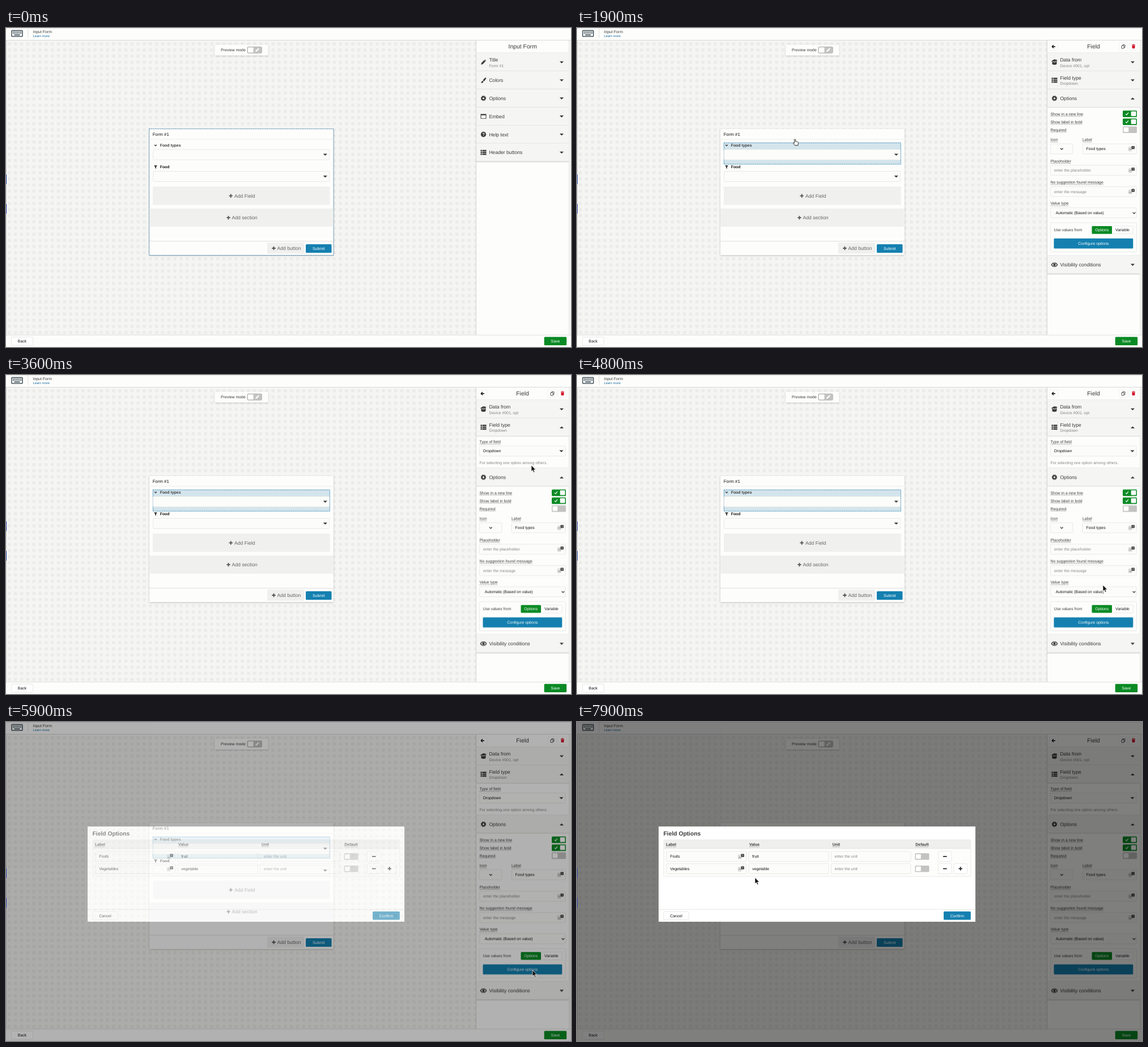
An HTML page for the animation above (8000 ms loop, 997x562 px).

```html
<!DOCTYPE html>
<html lang="en">
<head>
<meta charset="utf-8">
<title>Form editor</title>
<style>
  html, body { margin: 0; width: 100%; height: 100%; overflow: hidden; background: #fdfdfc; }
  svg { display: block; width: 100vw; height: 100vh; }
  text { font-family: "Liberation Sans", Arial, sans-serif; fill: #3a3a3a; text-rendering: geometricPrecision; white-space: pre; }
  .bold { font-weight: 700; }
  .mid { text-anchor: middle; }
  .white { fill: #fff; }
  .black { fill: #111; }
  .soft { fill: #858585; }
  .grey { fill: #666; }
  .link { fill: #1a6f9f; }
  .icon { fill: #3a3a3a; }
  .line { fill: none; stroke: #3a3a3a; }
</style>
</head>
<body>
<svg id="stage" viewBox="0 0 997 562" xmlns="http://www.w3.org/2000/svg"></svg>
<script>
const BLUE = '#1580b0', GREEN = '#0a8a24', EDGE = '#e4e4e2', PALE = '#f5f5f3', PAPER = '#fdfdfc';
const S = 6.92, M = 8.65, L = 10.38;

// Text is placed by the middle of its capitals
const text = (x, y, s, cls = '', size = S) =>
  `<text x="${x}" y="${y + size * .36}" font-size="${size}" class="${cls}">${s}</text>`;
const label = (x, y, s, cls = '') => text(x, y, s, 'label ' + cls);
const box = (x, y, w, h, fill, stroke = 'none', r = 0, extra = '') =>
  `<rect x="${x}" y="${y}" width="${w}" height="${h}" rx="${r}" fill="${fill}" stroke="${stroke}" stroke-width=".8" ${extra}/>`;
const rule = (x1, y1, x2, y2, color = '#dcdcda') =>
  `<path d="M${x1} ${y1}L${x2} ${y2}" stroke="${color}" stroke-width=".9"/>`;
const group = (cls, ...parts) => `<g class="${cls}">${parts.join('')}</g>`;
const at = (x, y, ...parts) => `<g transform="translate(${x} ${y})">${parts.join('')}</g>`;
const caret = (x, y, up) => at(x, y, `<path d="${up ? 'M-3.6 1.8h7.2L0-1.8z' : 'M-3.6-1.8h7.2L0 1.8z'}" class="icon"/>`);
const chevron = (x, y, k = 1) => at(x, y, `<path d="M${-2.4 * k} ${-1.2 * k}L0 ${1.2 * k}L${2.4 * k} ${-1.2 * k}" class="line" stroke-width="1.3"/>`);
const plus = (x, y, color = '#555', r = 3.2) =>
  `<path d="M${x - r} ${y}h${2 * r}M${x} ${y - r}v${2 * r}" stroke="${color}" stroke-width="1.8"/>`;
const button = (x, y, w, h, s, fill, cls = 'white', stroke = 'none') =>
  box(x, y, w, h, fill, stroke, 1.5) + text(x + w / 2, y + h / 2, s, 'mid ' + cls);
const toggle = (x, y, on) => box(x, y, 25, 11.4, on ? GREEN : '#c3c3c1', 'none', 1.5)
  + box(x + (on ? 14.7 : 1.5), y + 1.6, 8.8, 8.2, '#fff', 'none', 1)
  + (on ? `<path d="M${x + 5} ${y + 5.8}l1.8 1.8 3.2-4" fill="none" stroke="#fff" stroke-width="1.2"/>` : '');
const translate = (x, y) => at(x, y,
  box(-4.8, -2.4, 5, 6.2, '#fff', '#aaa', .5), text(-2.3, .8, 'A', 'mid', 5.2),
  box(0, -4.4, 5.4, 5.2, '#3a3a3a', 'none', .6), box(1.7, -2.9, 2.2, .7, '#ddd'), box(2.4, -2.2, .8, 1.6, '#ddd'));
const input = (x, y, w, s = '', cls = 'black', h = 17.8) =>
  box(x, y, w, h, '#fcfcfa', EDGE, 1.5) + text(x + 6.2, y + h / 2, s, cls);

const icons = {
  pencil: '<path d="M-4.2 4.2l.7-2.9L1.4-3.6l2.2 2.2-4.9 4.9zM2-4.2l.8-.6 2 2-.7.8z"/>',
  brush: '<path d="M4.6-4.6c-1-.5-4.6 3-5.6 4.8l1.6 1.6c1.8-1 5-5.2 4-6.4zM-1.5.9l1.5 1.5c0 2-2.5 2.6-4.6 2.2 1.4-.9 1-3.2 3.1-3.7z"/>',
  gear: '<circle r="2.7" fill="none" stroke="#3a3a3a" stroke-width="2.2"/><circle r="4" fill="none" stroke="#3a3a3a" stroke-width="1.5" stroke-dasharray="1.57"/>',
  frame: '<path d="M-5-4.2H5V4.2H-5zM-4-1.8V3.3H4V-1.8z" fill-rule="evenodd"/>',
  help: '<circle r="4.6"/>' + text(0, 0, '?', 'mid bold white', 7.5),
  list: [-3.2, 0, 3.2].map(y => box(-5, y - 1.2, 2.4, 2.4, '#3a3a3a') + box(-1.9, y - 1.2, 7, 2.4, '#3a3a3a')).join(''),
  data: '<path d="M-4-2.5C-3-4 3-4 4-2.5V3.2C3 5-3 5-4 3.2z"/><path d="M-5-1.5L0-4.5 4.8-3.3" fill="none" stroke="#3a3a3a" stroke-width="1.2"/><path d="M-3-1.2C-1 0 1 0 3-1.2" fill="none" stroke="#fff"/>',
  eye: '<path d="M-5.2 0C-3-4.2 3-4.2 5.2 0 3 4.2-3 4.2-5.2 0z" fill="none" stroke="#3a3a3a" stroke-width="1.2"/><circle r="2.2"/>',
  funnel: '<path d="M-2.9-2.9H2.9L.9 0V3L-.9 1.8V0z"/>'
};
const icon = (name, x, y) => at(x, y, `<g class="icon">${icons[name]}</g>`);

// Panel accordion header
const row = (y, name, title, sub, open) =>
  box(830, y, 163.5, 31.7, PALE) + rule(830, y + 31.7, 993.5, y + 31.7, '#d3d3d1')
  + icon(name, 842.5, y + 15.9) + text(852.4, y + (sub ? 11.5 : 15.9), title, '', M)
  + (sub ? text(852.4, y + 21.9, sub, 'soft') : '')
  + (open === null ? '' : caret(980.5, y + 16.2, open));

const topBar = group('', box(0, 0, 997, 21.5, PAPER), rule(0, .4, 997, .4, EDGE), rule(0, 21.5, 997, 21.5, '#d6d6d4'),
  box(10, 4.3, 19, 10.6, '#fff', '#24363f', 1, 'style="stroke-width:1.3"'),
  [6.7, 9.2].map(y => `<path d="M12 ${y}h15.5" stroke="#24363f" stroke-width="1.5" stroke-dasharray="1.5 .9"/>`).join(''),
  box(14.5, 11.5, 10, 1.5, '#24363f'), rule(39, 1, 39, 17.5),
  text(47.5, 7, 'Input Form'), text(47.5, 13.8, 'Learn more', 'link', 5.77));

const preview = group('',
  `<g filter="url(#shade)">${box(368.5, 29.5, 94, 18.7, PAPER)}</g>`,
  text(379, 38.8, 'Preview mode'), box(426, 33.2, 25.3, 11, '#c3c3c1', '#aaa', 1.5), box(427, 34.2, 9.5, 9, '#fff', 'none', 1),
  at(443.5, 38.7, `<g fill="#fff" transform="scale(.8)">${icons.pencil}</g>`));

const form = group('',
  `<g filter="url(#shade)">${box(253, 178, 324.8, 222, PAPER)}</g>`,
  group('formEdge', box(252.7, 177.7, 325.3, 222.8, 'none', '#2b74a0', 0, 'stroke-dasharray="2.2 1"')),
  text(258.8, 186.8, 'Form #1', 'black', 7.79), rule(253, 196, 577.5, 196, '#ebebe9'),
  group('tint', box(259, 202, 312.5, 38, '#d3e4ec')),
  group('press', box(259, 202, 312.5, 38, '#a9cbdc')),
  group('picked', box(259.3, 202.3, 312, 37.7, 'none', '#1f7cab', 0, 'stroke-dasharray="2.2 1"')),
  chevron(264, 206.7, .8), text(271.7, 206.5, 'Food types', 'bold'),
  input(259.6, 214, 311, '', '', 18.3), caret(563.3, 223.2),
  icon('funnel', 264, 245), text(271.7, 245, 'Food', 'bold black'),
  input(259.6, 252.5, 311, '', '', 18), caret(563.3, 261.7),
  box(259, 279.3, 312.5, 32.3, '#f0f0ef'), plus(396.7, 295.7), text(403, 295.7, 'Add Field', 'grey', M),
  box(253.2, 318, 324.3, 32, '#f0f0ef'), plus(392.5, 334.2), text(398.5, 334.2, 'Add section', 'grey', M),
  rule(253, 375.6, 577.5, 375.6),
  box(461, 378, 65, 19.5, '#f0f0ef'), plus(472.5, 388), text(478.5, 388, 'Add button', 'grey', M),
  button(529, 381, 45.5, 15, 'Submit', BLUE));

const formPanel = group('formPanel',
  text(911.7, 32.7, 'Input Form', 'mid', L), rule(830, 44, 993.5, 44),
  [['pencil', 'Title', 'Form #1'], ['brush', 'Colors'], ['gear', 'Options'], ['frame', 'Embed'], ['help', 'Help text'], ['list', 'Header buttons']]
    .map(([name, title, sub], i) => row(44.3 + i * 31.8, name, title, sub)).join(''),
  box(830, 235, 163.5, 2, '#00000010'));

const options = group('options',
  row(108, 'gear', 'Options', '', true),
  ['Show in a new line', 'Show label in bold', 'Required'].map((s, i) =>
    label(835.5, 151.2 + i * 14, s) + toggle(963, 145.5 + i * 14, i < 2)).join(''),
  label(835.5, 196.7, 'Icon'), input(835.7, 204, 39.3), chevron(855.3, 213),
  label(892, 196.7, 'Label'), input(892.3, 204, 95, 'Food types'), translate(978.5, 212.5),
  label(835.5, 234.5, 'Placeholder'), input(835.7, 241.8, 151.5, 'enter the placeholder', 'soft'), translate(978.5, 250.5),
  label(835.5, 271.7, 'No suggestion found message'), input(835.7, 279.3, 151.5, 'enter the message', 'soft'), translate(978.5, 288),
  label(835.5, 309, 'Value type'), input(835.7, 316.8, 151.5), text(844.7, 326, 'Automatic (Based on value)', 'black'), chevron(983, 326),
  box(835.7, 343, 151.8, 51.5, PAPER, EDGE, 1.5), text(841.5, 356, 'Use values from'),
  button(944, 349, 37, 13.8, 'Variable', '#fff', 'black', EDGE), button(908.5, 349, 35.5, 13.8, 'Options', GREEN),
  button(841.5, 370.8, 139.8, 17.6, 'Configure options', BLUE),
  group('configHover', button(841.5, 370.8, 139.8, 17.6, 'Configure options', '#126f9a')),
  rule(830, 401, 993.5, 401), row(401.2, 'eye', 'Visibility conditions'), box(830, 433, 163.5, 2, '#00000010'));

const fieldPanel = group('fieldPanel',
  text(911.5, 32.7, 'Field', 'mid', L), rule(830, 44, 993.5, 44),
  [833.5, 956.5, 974.5].map(x => box(x, 26.5, 15, 12.5, '#fff', '#efefed', 1.5)).join(''),
  '<path d="M844 32.7h-5.5M841 30l-2.7 2.7 2.7 2.7" fill="none" stroke="#111" stroke-width="1.4"/>',
  box(962.8, 29.5, 4.2, 5, '#fff', '#222', .5), box(961, 31, 4.2, 5, '#fff', '#222', .5),
  '<path d="M979.3 30.7h5.4l-.4 5.3h-4.6zM979 29.2h6v1h-6zM981 28.6h2v.8h-2z" fill="#d3172c"/>',
  row(44.3, 'data', 'Data from', 'Device #001, opt'),
  row(76.1, 'list', 'Field type', 'Dropdown', null),
  group('typeHover', box(830, 76.6, 163.5, 31, '#e2e2e0'), icon('list', 842.5, 92), text(852.4, 87.6, 'Field type', '', M), text(852.4, 98, 'Dropdown', 'soft')),
  group('typeShut', caret(980.5, 92.3)),
  group('typeOpen', caret(980.5, 92.3, true), label(835.5, 117.7, 'Type of field'),
    input(835.7, 125, 151.5, 'Dropdown'), caret(980, 134.2),
    text(835.5, 155, 'For selecting one option among others.', 'soft'), rule(830, 164, 993.5, 164)),
  options);

const optionRow = (y, name, value) => input(158, y, 140.5, name) + translate(289.5, y + 9)
  + input(303, y, 141, value) + input(448.5, y, 140.5, 'enter the unit', 'soft') + toggle(596.5, y + 3.3)
  + box(637.5, y, 23.5, 17.8, '#fff', EDGE, 1.5) + box(646, y + 8, 6.6, 1.7, '#222');

const modal = group('modal', box(144, 184.3, 559, 167.5, '#fff', 'none', 1),
  text(152.5, 196.2, 'Field Options', 'bold', 10.3),
  box(153, 207.5, 542, 64.7, PAPER, EDGE, 1.5), box(153.3, 207.8, 541.5, 15.2, '#efefee'), rule(153, 223, 695, 223, EDGE),
  [[157, 'Label'], [304, 'Value'], [450.7, 'Unit'], [597.3, 'Default']].map(([x, s]) => label(x, 215.7, s, 'bold')).join(''),
  optionRow(228, 'Fruits', 'fruit'), optionRow(249.6, 'Vegetables', 'vegetable'),
  box(665, 249.6, 23.5, 17.8, '#fff', EDGE, 1.5), plus(676.7, 258.4, '#222'),
  rule(144, 330.2, 703, 330.2, EDGE),
  button(152.7, 334, 44.6, 14.3, 'Cancel', '#fff', 'black', EDGE),
  button(647, 333.8, 47.8, 14.7, 'Confirm', BLUE));

// The shade leaves the dialog area clear, so the dialog crossfades with the bright form
const dim = group('dim', '<path d="M0 0H997V562H0zM144 184.3V351.8H703V184.3z" fill-rule="evenodd"/>');

const cursor = group('pointer',
  group('arrow', '<path d="M0 0V11L2.5 8.7 4.2 12.7 6 11.9 4.3 8.1H7.7z" fill="#111" stroke="#fff" stroke-width=".7"/>'),
  group('hand', '<path d="M-1 .8C-1-.4.8-.4.8.8V4C2 3.4 2.8 3.8 3 4.5 4 4 4.6 4.5 4.8 5.1 5.6 4.9 6 5.4 6 6.2L5.3 10.8H-.2L-3 7.2C-3.4 6.2-2.3 5.6-1 7z" fill="#fff" stroke="#111" stroke-width=".9"/>'),
  group('beam', '<path d="M-2.5-7Q0-7 0-5.5Q0-7 2.5-7M0-5.5V5.5M-2.5 7Q0 7 0 5.5Q0 7 2.5 7" fill="none" stroke="#111" stroke-width="1"/>'));

const stage = document.getElementById('stage');
stage.innerHTML = `<defs>
  <pattern id="dots" x="3" y="25" width="10.82" height="10.82" patternUnits="userSpaceOnUse">
    <rect width="5.8" height="5.6" rx="2.2" fill="#ebebe9"/></pattern>
  <filter id="shade" x="-10%" y="-20%" width="120%" height="150%">
    <feDropShadow dx="0" dy="1" stdDeviation="1.8" flood-opacity=".22"/></filter></defs>`
  + box(0, 0, 997, 562, PALE) + box(0, 22, 830, 519, 'url(#dots)') + rule(.5, 22, .5, 541, '#d0d0ce')
  + topBar + preview + form
  + box(829.5, 22, 164.2, 519, PAPER) + rule(829.5, 22, 829.5, 541, '#cfcfcd') + rule(993.7, 22, 993.7, 541, EDGE)
  + formPanel + fieldPanel
  + box(0, 541, 997, 21, PAPER) + rule(0, 541, 997, 541)
  + button(9.5, 544.5, 38, 14.5, 'Back', '#fff', 'black', EDGE) + button(949.7, 544.3, 39.5, 14.8, 'Save', GREEN)
  + dim + box(0, 258, 1, 17, '#2444a8') + box(0, 310, 1, 17, '#2444a8')
  + modal + cursor;

// Dotted underline below each label
for (const el of stage.querySelectorAll('.label')) {
  const x = +el.getAttribute('x'), y = +el.getAttribute('y') + 1.6;
  el.insertAdjacentHTML('afterend', `<path d="M${x} ${y}h${el.getComputedTextLength()}" stroke="#555" stroke-width=".7" stroke-dasharray=".8 .5"/>`);
}

// Keys are [ms, css, steps until the next key]
const LOOP = 8000;
const animate = (name, keys) => `@keyframes ${name}{${keys.map(([ms, css, n = 1]) =>
  `${ms / LOOP * 100}%{${css};animation-timing-function:steps(${n})}`).join('')}}
  .${name}{animation:${name} ${LOOP}ms infinite}`;
const fade = (name, keys) => animate(name, keys.map(([ms, v]) => [ms, `opacity:${v}`]));
// Times alternate between appearing and vanishing
const show = (name, ...times) => fade(name, [
  ...(times[0] ? [[0, 0]] : []), ...times.map((ms, i) => [ms, 1 - i % 2])]);

const path = [
  [0, 86, 13], [500, 166, 92], [600, 166, 92, 4], [1000, 286, 208], [1200, 294, 212],
  [1700, 294, 212, 3], [2000, 430, 188, 3], [2300, 770, 125, 3], [2600, 926, 96],
  [3300, 926, 96, 9], [4200, 929, 285, 6], [4800, 928, 370, 3], [5100, 928, 407, 3], [5400, 929, 437],
  [6000, 927, 435], [6100, 906, 411], [6200, 906, 411, 4], [6600, 387, 291],
  [6700, 387, 291, 4], [7100, 222, 255], [7300, 248, 252], [7400, 215, 252], [7500, 236, 252],
  [7600, 236, 252, 3], [7900, 314, 274]
];

const style = document.createElement('style');
style.textContent = [
  animate('pointer', path.map(([ms, x, y, n]) => [ms, `transform:translate(${x}px,${y}px)`, n])),
  show('arrow', 400, 1000, 2100, 2500, 3500, 3700, 3800, 5300, 5800, 7100, 7800),
  show('hand', 1000, 2100, 2500, 3500, 3700, 3800, 5300, 5800),
  show('beam', 7100, 7800),
  show('formEdge', 0, 1800), show('tint', 1000), show('press', 1600, 1800), show('picked', 1800),
  show('formPanel', 0, 1800), show('fieldPanel', 1800),
  show('typeHover', 2600, 3500), show('typeShut', 0, 2700), show('typeOpen', 2700),
  show('configHover', 5300, 5800),
  animate('options', [[0, 'transform:none'], [2700, 'transform:translateY(56.25px)']]),
  fade('dim', [[0, 0], [5700, .05], [5800, .17], [5900, .3], [6000, .45], [6100, .5]]),
  fade('modal', [[0, 0], [5700, .06], [5800, .27], [5900, .57], [6000, .92], [6100, 1]])
].join('\n');
document.head.append(style);
</script>
</body>
</html>
```
